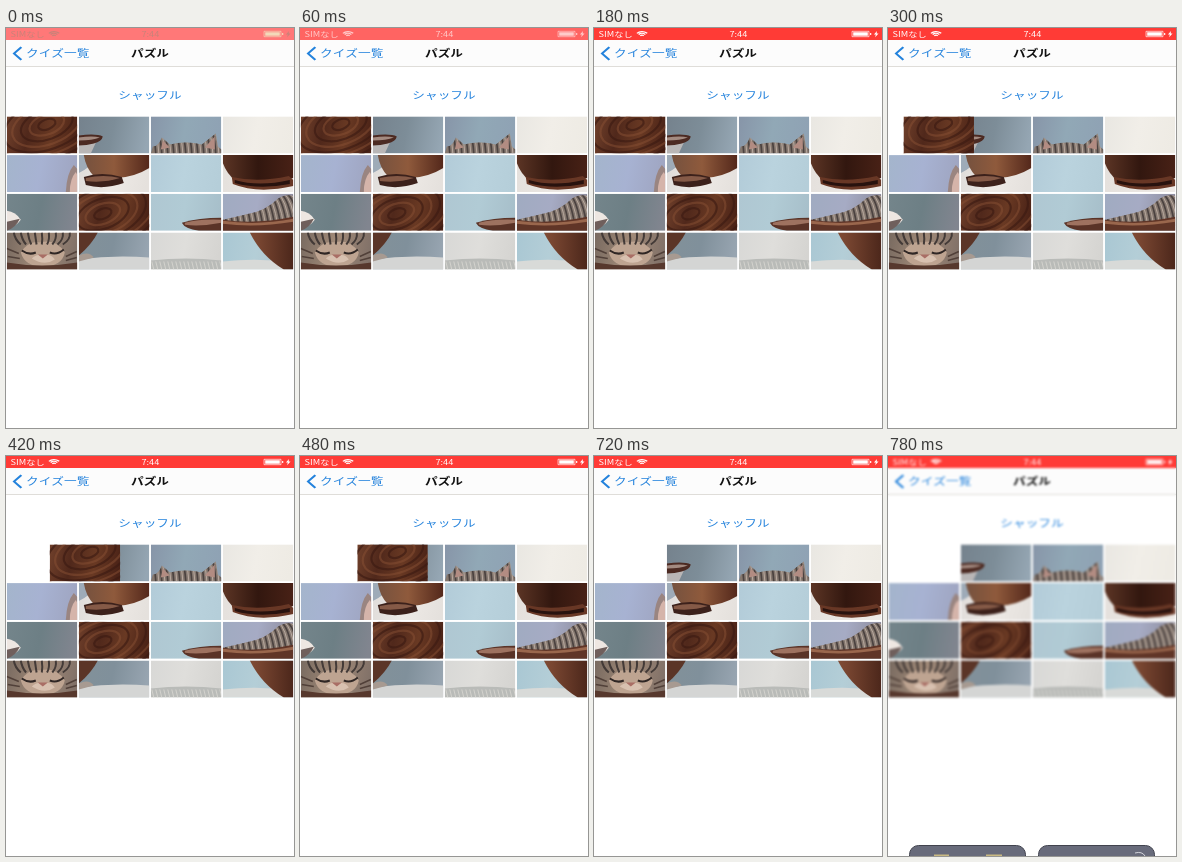
Animation, 288 px wide and 400 px high, one loop 840 ms. Source, as an HTML page with a canvas:

```html
<!DOCTYPE html>
<html lang="ja">
<head>
<meta charset="utf-8">
<title>パズル</title>
<style>
  html, body { margin: 0; width: 100%; height: 100%; overflow: hidden; background: #fff; }
  canvas { display: block; }
</style>
</head>
<body>
<canvas id="stage" width="288" height="400"></canvas>
<script>
const W = 288, H = 400, LOOP = 840, STEP = 60;
const TILE_W = 70.5, TILE_H = 37, PITCH_X = 72, PITCH_Y = 38.7;
const BLUE = '#2382dc';
const FONT = '"Noto Sans CJK JP", "Noto Sans CJK", sans-serif';

const screen = document.getElementById('stage').getContext('2d');
const buffer = document.createElement('canvas');
buffer.width = W;
buffer.height = H;
let ctx = buffer.getContext('2d');

const clamp = v => Math.min(1, Math.max(0, v));
const easeInOut = v => (1 - Math.cos(Math.PI * clamp(v))) / 2;
const mix = (a, b, k) => a + (b - a) * k;

function shape(color, path) {
  ctx.fillStyle = color;
  ctx.fill(new Path2D(path));
}

function line(color, width, path) {
  ctx.strokeStyle = color;
  ctx.lineWidth = width;
  ctx.stroke(new Path2D(path));
}

function fade(colors, x = TILE_W, y = 0) {
  const g = ctx.createLinearGradient(0, 0, x, y);
  colors.forEach((c, i) => g.addColorStop(i / (colors.length - 1), c));
  return g;
}

function back(...colors) {
  ctx.fillStyle = fade(colors, TILE_W, 14);
  ctx.fillRect(0, 0, TILE_W, TILE_H);
}

// Nested grain arcs on dark wood
function wood(cx, cy) {
  back('#70402b', '#50281b', '#693923', '#4b2317');
  for (let i = 1; i < 8; i++) {
    ctx.strokeStyle = i % 2 ? '#3b1a12a0' : '#87513580';
    ctx.lineWidth = 2.2;
    ctx.beginPath();
    ctx.ellipse(cx, cy, i * 9, i * 5, -0.35, 0, Math.PI * 2);
    ctx.stroke();
  }
}

// Slanted fur stripes inside the current shape
function fur(path, x0, x1, y0, y1, lean) {
  shape('#85786f', path);
  ctx.save();
  ctx.clip(new Path2D(path));
  for (let x = x0; x < x1; x += 6) {
    line('#4b4240', 1.7, `M${x} ${y0}q${lean} 5 ${lean * 1.5} ${y1 - y0}`);
    line('#b9aaa0', 1, `M${x + 3} ${y0}q${lean} 5 ${lean * 1.5} ${y1 - y0}`);
  }
  ctx.restore();
}

const tiles = [
  () => wood(40, 8),
  () => {
    back('#75828d', '#7d8d98', '#95a6b3');
    shape('#b9b6b6', 'M0 27Q14 29 18 24L12 37H0Z');
    shape('#4c2a22', 'M0 19Q18 17 24 20Q23 25 15 27Q8 29 0 29Z');
    shape('#a38a80', 'M0 21Q14 19 21 21Q14 24 0 24Z');
  },
  () => {
    back('#8795a8', '#91a8b6', '#8fa2b4');
    fur('M0 37L2 30Q8 30 11 21L19 28Q35 24 51 28L65 17L67 30L70.5 33V37Z', 2, 70, 18, 37, 2);
    shape('#b28c82', 'M10 33L12 24L19 31ZM54 31L64 20L64 33Z');
  },
  () => back('#e9e7e2', '#f1eee8', '#eeebe4'),
  () => {
    back('#a4b5cc', '#a7b2d2', '#9fa5c1');
    shape('#9a8581', 'M59 37Q60 18 67 10L70.5 14V37Z');
    shape('#d5b4aa', 'M63 37Q63 24 69 17L70.5 20V37Z');
  },
  () => {
    back('#dedbd9', '#eeeae6', '#e5e1dd');
    shape('#9eabb8', 'M0 0H20Q10 14 0 18Z');
    shape(fade(['#71503f', '#8f5a3c', '#54281b']), 'M5 0H70.5V13Q56 22 38 23L15 21Q7 13 5 0Z');
    shape('#3c211b', 'M5 22Q23 16 43 22L45 28Q25 35 7 30Z');
    shape('#855a47', 'M7 23Q25 19 41 23Q26 28 7 26Z');
  },
  () => back('#b2cbd8', '#bad3de', '#b5ced9'),
  () => {
    back('#e4e0dc', '#eeeae6');
    shape(fade(['#5c3525', '#32170f', '#482116']), 'M0 0H70.5V23Q36 35 13 26Q4 19 0 8Z');
    shape('#683725', 'M9 22Q35 28 66 21L70.5 25V31Q35 39 10 29Z');
    shape('#28120e', 'M12 25Q36 32 67 25V29Q36 35 12 28Z');
  },
  () => {
    back('#74858b', '#6d7f85', '#81858f');
    shape('#eee7e2', 'M0 17Q9 18 14 26Q10 32 0 35Z');
    shape('#6f5f5c', 'M0 28L13 25Q9 34 0 37Z');
  },
  () => wood(24, 20),
  () => {
    back('#afc7d2', '#b1cbd5', '#a7bfca');
    shape('#5a3327', 'M31 29Q48 24 70.5 24V37H48Q34 35 31 29Z');
    shape('#9e7260', 'M34 29Q50 25 70.5 26V29Q50 33 34 31Z');
  },
  () => {
    back('#a0abc1', '#a6abc4', '#8d8c9d');
    fur('M0 26Q14 23 26 20Q43 17 55 5Q62 0 70.5 2V37H0Z', -8, 72, 0, 32, 8);
    shape('#603527', 'M0 26Q32 31 70.5 23V37H0Z');
    shape('#9a674d', 'M0 27Q35 32 70.5 25V28Q34 34 0 30Z');
  },
  () => {
    back('#786a60', '#a18a78', '#817168');
    shape('#bea491', 'M14 20Q22 7 34 10Q49 6 58 20Q55 34 36 34Q18 34 14 20Z');
    for (let x = 7; x < 67; x += 7) {
      line('#433a37', 2, `M${x} 0Q${x + 1} 7 ${mix(x, 35, .25)} 12`);
    }
    line('#302725', 2, 'M15 18Q22 23 29 20M43 20Q50 23 57 17');
    line('#514039', 1.5, 'M0 16L12 21M1 24L13 26M59 24L70 19M59 28L70 25');
    shape('#d8c1b0', 'M25 26Q31 20 36 24Q43 20 48 27Q38 34 25 26Z');
    shape('#a96e65', 'M31 22H41L36 26Z');
    shape('#57382d', 'M0 30Q35 36 70.5 30V37H0Z');
  },
  () => {
    back('#829199', '#80909b', '#98a5b1');
    shape('#d4d5d4', 'M0 27Q35 22 70.5 25V37H0Z');
    shape('#5b3527', 'M0 0H19Q13 12 0 23Z');
    shape('#a79a91', 'M0 23Q10 18 15 25L0 29Z');
  },
  () => {
    back('#d8d8d6', '#dfdedb', '#d5d4d1');
    shape('#b9bbb8', 'M0 28Q35 24 70.5 28V37H0Z');
    for (let x = 1; x < 70; x += 4) line('#d3d2cd', 1, `M${x} 29L${x + 2} 37`);
  },
  () => {
    back('#a9c7d3', '#b4ced7', '#b2c3ca');
    shape('#d8dad8', 'M0 29Q35 25 70.5 30V37H0Z');
    shape(fade(['#925b3e', '#794631', '#4c271b']), 'M27 0H70.5V37H61Q39 24 27 0Z');
  }
];

function drawTile(index, dx = 0) {
  ctx.save();
  ctx.translate(.8 + (index % 4) * PITCH_X + dx, 88.4 + Math.floor(index / 4) * PITCH_Y);
  ctx.beginPath();
  ctx.rect(0, 0, TILE_W, TILE_H);
  ctx.clip();
  tiles[index]();
  ctx.restore();
}

function label(text, x, y, size, color, weight = 400, align = 'left') {
  ctx.font = `${weight} ${size}px ${FONT}`;
  ctx.fillStyle = color;
  ctx.textAlign = align;
  ctx.textBaseline = 'alphabetic';
  ctx.fillText(text, x, y);
}

function statusBar(t) {
  const k = clamp(t / 180);
  ctx.fillStyle = `rgb(255, ${mix(120, 59, k)}, ${mix(120, 54, k)})`;
  ctx.fillRect(0, 0, 375, 20);
  const ink = t ? `rgba(255, 255, 255, ${mix(.5, 1, k)})` : '#c88279';
  label('SIMなし', 6, 14.5, 12, ink);
  label('7:44', 188, 14.5, 12, ink, 500, 'center');
  for (const r of [3, 6, 9]) {
    ctx.beginPath();
    ctx.arc(62.5, 15, r, -Math.PI * .76, -Math.PI * .24);
    ctx.strokeStyle = ink;
    ctx.lineWidth = 2;
    ctx.stroke();
  }
  const power = t ? ink : '#f3d9b9';
  line(power, 1, 'M336 5.5H358V14.5H336Z');
  shape(power, 'M337.5 7H356.5V13H337.5ZM359.5 8.5H361V11.5H359.5Z');
  shape(ink, 'M368.5 5L364.5 11H367L366 15.5L370.5 9H368Z');
}

// Interface laid out in 375 x 667 points
function chrome(t) {
  ctx.save();
  ctx.scale(W / 375, H / 667);
  ctx.fillStyle = '#fcfcfc';
  ctx.fillRect(0, 20, 375, 44);
  ctx.fillStyle = '#cbc8c2';
  ctx.fillRect(0, 64, 375, 1);
  statusBar(t);
  line(BLUE, 3, 'M20 32L10.5 42.5L20 53');
  label('クイズ一覧', 26, 48, 16.5, BLUE);
  label('パズル', 187.5, 48, 16.5, '#111', 700, 'center');
  label('シャッフル', 187.5, 119, 16.5, BLUE, 400, 'center');
  ctx.restore();
}

function bottomButtons() {
  for (const x of [21.5, 150.5]) {
    ctx.beginPath();
    ctx.roundRect(x, 389.5, 116, 30, 9);
    ctx.fillStyle = '#686b7b';
    ctx.fill();
    ctx.strokeStyle = '#41434e';
    ctx.lineWidth = 1;
    ctx.stroke();
  }
  shape('#c9b982', 'M46 398.5H61V400H46ZM98 398.5H114V400H98Z');
  line('#d2d3da', 1, 'M247 397Q254 395 257 400');
}

function render(t) {
  ctx = buffer.getContext('2d');
  ctx.fillStyle = '#fff';
  ctx.fillRect(0, 0, W, H);
  chrome(t);
  for (let i = 1; i < tiles.length; i++) drawTile(i);
  if (t < 640) drawTile(0, PITCH_X * easeInOut((t - 164) / 456));

  ctx = screen;
  ctx.drawImage(buffer, 0, 0);
  if (t >= 780) {
    ctx.filter = 'blur(1.2px)';
    ctx.drawImage(buffer, 0, 0);
    ctx.filter = 'none';
    bottomButtons();
  }
}

const start = performance.now();
function tick() {
  const t = (performance.now() - start) % LOOP;
  render(Math.floor(t / STEP) * STEP);
  requestAnimationFrame(tick);
}
tick();
</script>
</body>
</html>
```
